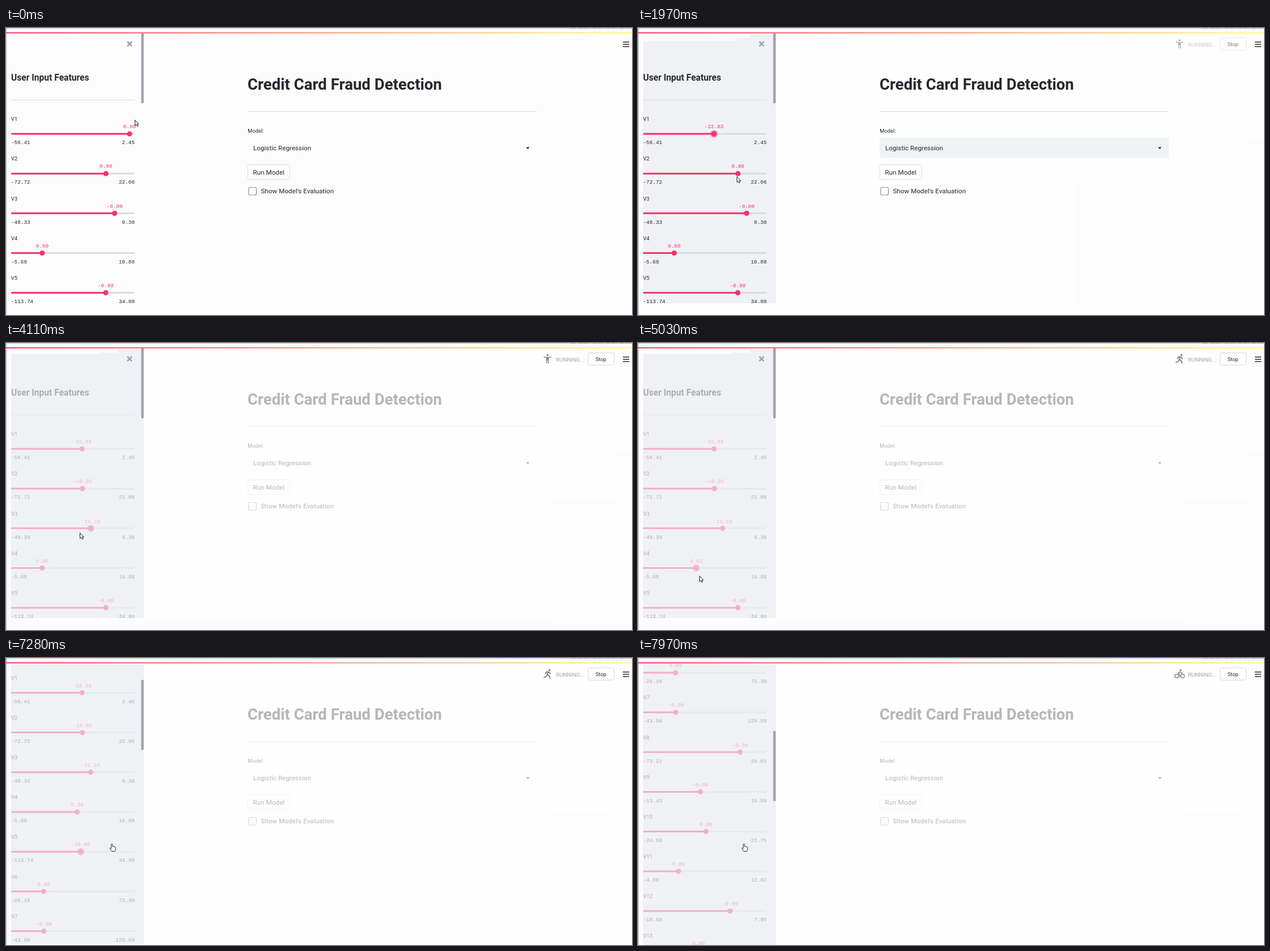
These frames come from a looping animation (1104 by 507 pixels, 8000 ms). An HTML page:

```html
<!DOCTYPE html>
<html lang="en">
<head>
<meta charset="utf-8">
<title>Fraud detection form</title>
<style>
  html, body { margin: 0; width: 100%; height: 100%; overflow: hidden; background: #fcfcfc; }
  svg { display: block; width: 100%; height: 100%; }
  text { font-family: Roboto, sans-serif; fill: #262730; }
  .mono { font: 9.33px "Liberation Mono", monospace; }
  .value { fill: #f63366; text-anchor: middle; }
  .label { font-size: 9.3px; }
  .body { font-size: 11.7px; }
  .line { stroke: #d8d9dd; }
  .icon { stroke: #85868c; stroke-width: 1.5; fill: none; stroke-linecap: round; stroke-linejoin: round; }
  .icon .solid { fill: #85868c; stroke: none; }
  .cursor { fill: #fff; stroke: #222; stroke-width: 1; stroke-linejoin: round; }
</style>
</head>
<body>
<svg viewBox="0 0 1104 507">
  <defs>
    <linearGradient id="stripe">
      <stop offset="0" stop-color="#f63366"/><stop offset="1" stop-color="#fffd80"/>
    </linearGradient>
    <clipPath id="page"><rect y="10" width="1104" height="497"/></clipPath>
  </defs>

  <g id="paint"></g>

  <g clip-path="url(#page)">
    <g id="sidebar">
      <g id="features">
        <text x="9" y="92.5" font-size="15.6" font-weight="700">User Input Features</text>
        <path class="line" d="M9 127.5H227"/>
      </g>
      <path d="M214 24l8 8m0-8l-8 8" stroke="#a3a4ae" stroke-width="2.6"/>
    </g>
  </g>
  <rect id="scrollbar" x="238.5" y="9" width="4.3" height="124" rx="1.5" fill="#9fa0ab"/>

  <rect id="select" x="426" y="194" width="510" height="35.5" rx="3" fill="#f0f2f6"/>
  <g id="main">
    <text x="426" y="108.6" font-size="27.55" font-weight="700">Credit Card Fraud Detection</text>
    <path class="line" d="M426 147.5H936"/>
    <text class="label" x="426.3" y="185">Model:</text>
    <text class="body" x="436" y="216">Logistic Regression</text>
    <path d="M917 210.5h6.4l-3.2 3.4z" fill="#262730"/>
    <rect x="426.5" y="241.5" width="74" height="26" rx="3" fill="#fff" fill-opacity=".5" stroke="#dcdde2"/>
    <text class="body" x="435.5" y="258.6">Run Model</text>
    <rect x="428" y="281.5" width="13.5" height="13.5" rx="2.5" fill="#fff" stroke="#8f929b" stroke-width="1.2"/>
    <text class="body" x="449.5" y="292.4">Show Model's Evaluation</text>
  </g>

  <g id="status">
    <g transform="translate(955 28)">
      <g class="icon" data-icon="stand">
        <circle class="solid" cy="-6.4" r="1.8"/>
        <path class="solid" d="M-6.8 -4.2Q0 -2.4 6.8 -4.2V-2.7L2.4 -1.7V8H.8V3H-.8V8H-2.4V-1.7L-6.8 -2.7z"/>
      </g>
      <g class="icon" data-icon="chair">
        <circle class="solid" cx="3.4" cy="-5.6" r="1.8"/>
        <path d="M-3.6 -3L-.6 -4.4L2 -2.6L-.6 .8L4.2 1.4L3.6 6M-4.4 .4A3.9 3.9 0 1 0 1.4 5"/>
      </g>
      <g class="icon" data-icon="run">
        <circle class="solid" cx="3.2" cy="-6.6" r="1.8"/>
        <path d="M-3.4 -.6L-2 -3.4L1.6 -3.6L5 -.6M1.4 -3.4L-.4 1L3 3.6L4.4 7.6M-.4 1L-2.2 4.4L-6 6.4" stroke-width="2"/>
      </g>
      <g class="icon" data-icon="bike">
        <circle class="solid" cx="2" cy="-6.4" r="1.7"/>
        <circle cx="-5" cy="3.8" r="3.3"/><circle cx="5.4" cy="3.8" r="3.3"/>
        <path d="M5.4 -1.4H3L.6 -3.6L-2.4 -.6L.4 1.8V5.2"/>
      </g>
    </g>
    <text x="970" y="32.8" font-size="9.7" style="fill:#a3a5ae">RUNNING...</text>
    <rect x="1026.5" y="17.5" width="46" height="21.5" rx="3" fill="#fff" stroke="#d5d6dc"/>
    <text class="label" x="1049.3" y="32" text-anchor="middle">Stop</text>
  </g>

  <path d="M1088 24.8h11m-11 4h11m-11 4h11" stroke="#262730" stroke-width="1.6"/>
  <path d="M0 .5H1104" stroke="#c4c4c4"/>
  <path d="M996 .4H1104" stroke="#8a8a8a" stroke-width=".8" stroke-dasharray="5 2 3 4 8 2"/>
  <path d="M.5 0V507" stroke="#b4b4b4"/>
  <rect y="7.5" width="1104" height="2" fill="url(#stripe)"/>

  <g id="pointer" class="cursor">
    <path data-cursor="arrow" d="M.5 .5V10.5L2.8 8.4L4.4 11.8L6 11.1L4.5 7.8H7.3z"/>
    <path data-cursor="hand" d="M-1.4 7.6V1Q-.3 -.4 .9 1V5Q2.2 4.2 3 5.4Q4.2 4.8 5 6Q6.6 5.8 6.5 7.6Q6.5 11 5 13.5H-.6Q-1.6 11.2 -4 8.6Q-3.4 6.6 -1.4 8.6z"/>
    <path data-cursor="grab" d="M-3 1V-3Q-2 -4.8 -.9 -3.6Q.2 -5 1.4 -3.5Q2.8 -4.3 3.5 -2.6Q5.3 -2.6 5.2 -.6Q5.2 3 3.5 6.2H-2Q-3 4 -5 2Q-4.6 0 -3 1zM-.9 -3.6V-1M1.4 -3.5V-1M3.5 -2.6V-.5"/>
  </g>
</svg>

<script>
const LOOP = 8000, ROW = 70.18, LEFT = 9, TRACK = 218;
const $ = id => document.getElementById(id);

function add(parent, tag, attrs, content = '') {
  const el = document.createElementNS('http://www.w3.org/2000/svg', tag);
  for (const key in attrs) el.setAttribute(key, attrs[key]);
  el.textContent = content;
  return parent.appendChild(el);
}

const clamp = p => Math.min(1, Math.max(0, p));
const smooth = p => p * p * (3 - 2 * p);

// Interpolates one column of [time, ...values] keys.
function at(keys, t, column = 1, ease = smooth) {
  const i = keys.findIndex(key => key[0] > t);
  if (i === 0) return keys[0][column];
  if (i < 0) return keys[keys.length - 1][column];
  const a = keys[i - 1], b = keys[i];
  return a[column] + (b[column] - a[column]) * ease((t - a[0]) / (b[0] - a[0]));
}

// Repainted areas: start, left, top, right, bottom.
const paints = [
  [1450, 198, 11, 1104, 194],
  [1600, 174, 17, 1073, 276],
  [1950, 9, 23, 770, 486],
  [2100, 168, 17, 964, 486],
  [2100, 9, 19, 964, 486],
  [5500, 182, 19, 964, 489],
  [7010, 9, 11, 964, 505],
  [7500, 9, 10, 964, 507],
].map(([start, x, y, right, bottom]) => {
  const g = add($('paint'), 'g', {});
  add(g, 'rect', { x, y, width: 243 - x, height: bottom - y, fill: '#f0f1f5' });
  add(g, 'rect', { x: 243, y, width: right - 243, height: bottom - y, fill: '#fefefe' });
  return { start, g };
});

// Minimum, maximum, then value keys.
const NEG = -0.001;
const sliders = [
  [-56.41, 2.45, [[1100, 0], [1420, -22.63]]],
  [-72.72, 22.06, [[2080, 0], [2500, -18.02]]],
  [-48.33, 9.38, [[3570, NEG], [3950, -11.15]]],
  [-5.68, 16.88, [[4840, 0], [4960, 4.01], [5260, 4.01], [5400, 6.36]]],
  [-113.74, 34.8, [[6165, NEG], [6600, -30]]],
  [-26.16, 73.3, [[0, 0]]],
  [-43.56, 120.59, [[0, NEG]]],
  [-73.22, 20.01, [[0, NEG]]],
  [-13.43, 15.59, [[0, NEG]]],
  [-24.59, 23.75, [[0, 0]]],
  [-4.8, 12.02, [[0, 0]]],
  [-18.68, 7.85, [[0, NEG]]],
  [-5.79, 7.13, [[0, 0]]],
].map(([min, max, keys], i) => {
  const g = add($('features'), 'g', { transform: `translate(0 ${i * ROW})` });
  const bar = { x: LEFT, y: 185.5, height: 3, rx: 1.5 };
  add(g, 'text', { class: 'label', x: LEFT, y: 164.3 }, 'V' + (i + 1));
  add(g, 'rect', { ...bar, width: TRACK, fill: '#d5dae5' });
  const fill = add(g, 'rect', { ...bar, fill: '#f63366' });
  const halo = add(g, 'circle', { cy: 187, r: 6.6, fill: '#f63366', 'fill-opacity': .5 });
  const thumb = add(g, 'circle', { cy: 187, r: 4.6, fill: '#f63366' });
  const value = add(g, 'text', { class: 'mono value', y: 177.3 });
  add(g, 'text', { class: 'mono', x: LEFT, y: 205.3 }, min.toFixed(2));
  add(g, 'text', { class: 'mono', x: LEFT + TRACK, y: 205.3, 'text-anchor': 'end' }, max.toFixed(2));
  return { min, max, keys, fill, halo, thumb, value };
});

const focusTimes = [1100, 2080, 3570, 4840, 6165];

const pointerKeys = [
  [0, 227, 162, 'arrow'], [60, 227, 162, 'arrow'],
  [240, 202, 183, 'hand'], [410, 202, 183, 'hand'], [780, 213, 184, 'hand'],
  [1100, 216, 187, 'grab'], [1420, 134, 187, 'arrow'], [1470, 134, 187, 'arrow'],
  [1650, 174, 262, 'arrow'], [1980, 174, 262, 'arrow'],
  [2080, 176, 257, 'grab'], [2500, 134, 257, 'arrow'], [2670, 134, 259, 'arrow'],
  [3180, 188, 332, 'arrow'], [3300, 191, 325, 'hand'],
  [3570, 191, 327, 'grab'], [3950, 149, 327, 'arrow'],
  [4310, 104, 346, 'arrow'], [4380, 104, 346, 'arrow'], [4650, 63, 387, 'hand'],
  [4840, 63, 396, 'grab'], [4960, 102, 397, 'arrow'],
  [5030, 108, 411, 'arrow'], [5180, 108, 411, 'arrow'],
  [5260, 102, 397, 'grab'], [5400, 125, 397, 'arrow'],
  [5630, 178, 478, 'arrow'], [5780, 178, 478, 'arrow'],
  [5930, 176, 470, 'grab'], [6165, 176, 470, 'grab'],
  [6600, 132, 469, 'arrow'], [6900, 187, 328, 'hand'],
];

const scrollKeys = [[7010, 0], [7130, 125], [7280, 125], [7970, 512]];

const iconKeys = [[0, 'run'], [200, 'stand'], [330, 'chair'], [560, 'bike'], [930, 'run']];
const iconPeriod = 1120, iconOffset = 560;

const latest = (keys, t) => keys.filter(key => key[0] <= t).pop();

function showOnly(attribute, name) {
  for (const el of document.querySelectorAll(`[data-${attribute}]`))
    el.style.display = el.dataset[attribute] === name ? '' : 'none';
}

function render(t) {
  for (const { start, g } of paints) g.style.display = t >= start ? '' : 'none';

  const fade = 1 - .67 * clamp((t - 1950) / 1420) ** 1.4;
  $('features').style.opacity = $('main').style.opacity = fade;
  $('select').style.opacity = t < 1600 ? 0 : clamp((fade - .5) / .5);

  const focused = focusTimes.filter(time => time <= t).length - 1;
  sliders.forEach((s, i) => {
    const v = at(s.keys, t);
    const x = LEFT + TRACK * (v - s.min) / (s.max - s.min);
    s.fill.setAttribute('width', x - LEFT);
    s.thumb.setAttribute('cx', x);
    s.halo.setAttribute('cx', x);
    s.halo.style.display = i === focused ? '' : 'none';
    s.value.setAttribute('x', x);
    s.value.textContent = v.toFixed(2);
  });

  const scroll = at(scrollKeys, t, 1, p => p);
  $('sidebar').setAttribute('transform', `translate(0 ${-scroll})`);
  $('scrollbar').setAttribute('y', 9 + scroll * .234);

  $('status').style.opacity = t < 1450 ? 0 : .2 + .8 * clamp((t - 1450) / 1050);
  showOnly('icon', latest(iconKeys, (t - iconOffset + iconPeriod + 10) % iconPeriod)[1]);

  $('pointer').setAttribute('transform', `translate(${at(pointerKeys, t, 1)} ${at(pointerKeys, t, 2)})`);
  showOnly('cursor', latest(pointerKeys, t)[3]);
}

function tick() {
  render(performance.now() % LOOP);
  requestAnimationFrame(tick);
}
tick();
</script>
</body>
</html>
```
